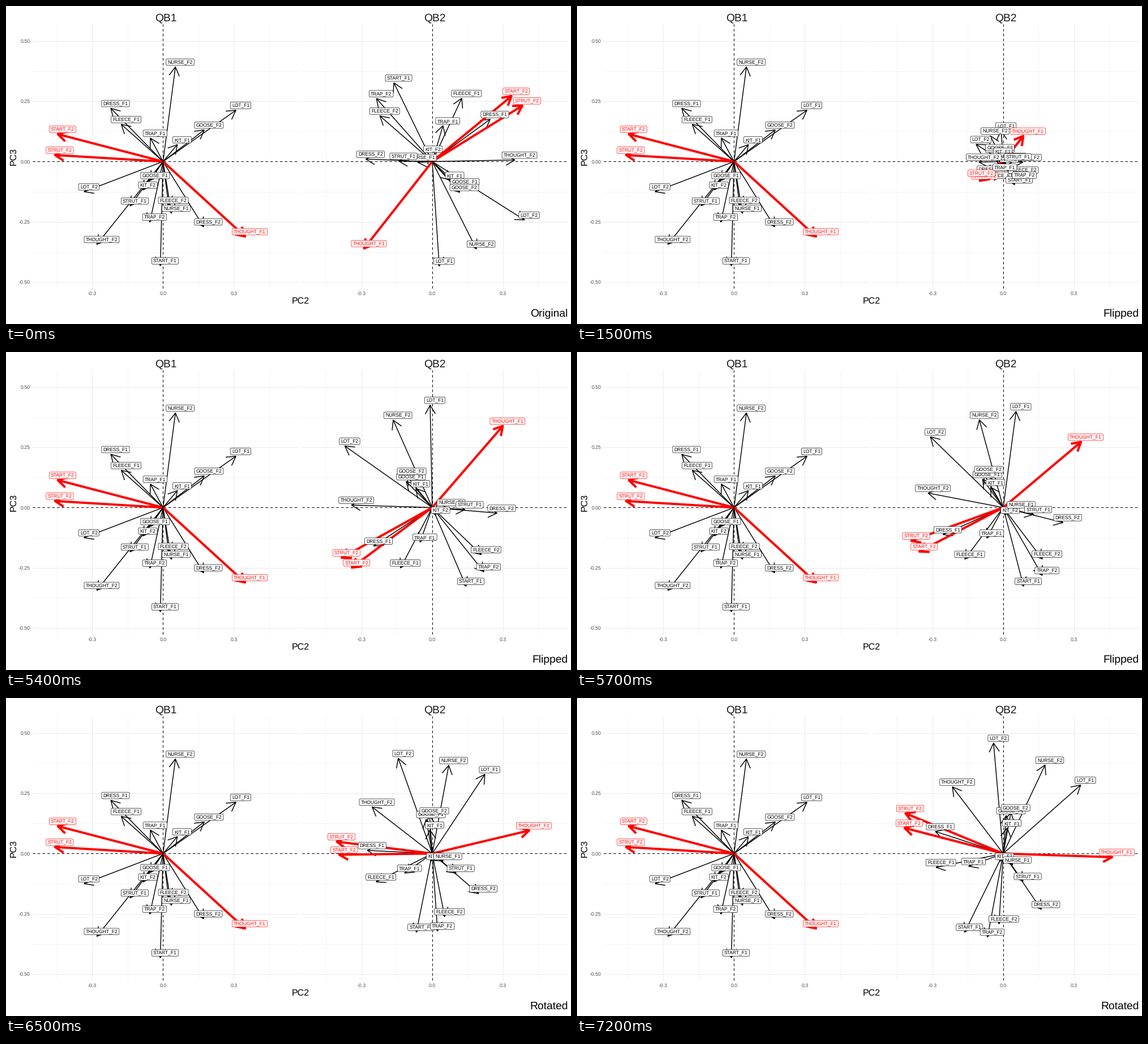
Write a matplotlib script that moves like this. It is 998 by 561 pixels and loops after 8 s.

```python
import numpy as np
import matplotlib.pyplot as plt
from matplotlib.animation import FuncAnimation
from matplotlib.patches import FancyBboxPatch

W, H, DPI = 998, 561, 64
PT = 72 / DPI                      # points per pixel
FRAMES, INTERVAL = 80, 100
FLIP_START, ROTATE_START, STEPS = 4, 53, 17
ANGLE = np.radians(-53.1)

SCALE = np.array([416.5, -425.7])  # pixels per data unit
ORIGINS = [np.array([277.4, 274.4]), np.array([752.9, 274.4])]
PANELS = [(47.5, 517.2), (523, 992.5)]
TOP, BOTTOM = 32.3, 498
NUDGE = 0.02
HEAD, HEAD_ANGLE = 18, np.radians(30)
LABEL_SIZE, LABEL_HEIGHT, LABEL_PAD = 8.54, 11.6, 5.2

VOWELS = "DRESS FLEECE GOOSE KIT LOT NURSE START STRUT THOUGHT TRAP".split()
NAMES = [f"{vowel}_F{n}" for vowel in VOWELS for n in (1, 2)]
HIGHLIGHTED = {"START_F2", "STRUT_F2", "THOUGHT_F1"}

QB1 = np.array([
    (-.2215, .2205), (.172, -.270), (-.177, .154), (.0235, -.181),
    (-.0535, -.078), (.1745, .131), (.0605, .070), (-.0845, -.1175),
    (.309, .2125), (-.3345, -.125), (.0355, -.214), (.0525, .392),
    (-.0115, -.4315), (-.446, .1135), (-.140, -.1835), (-.458, .027),
    (.3475, -.3105), (-.2805, -.343), (-.0535, .097), (-.056, -.2505)])
QB2 = np.array([
    (.2455, .175), (-.2815, .010), (.125, .262), (-.222, .189),
    (.118, -.1045), (.116, -.1275), (.075, -.077), (-.017, .031),
    (.030, -.433), (.391, -.242), (-.061, -.0035), (.187, -.362),
    (-.1625, .326), (.336, .271), (-.142, .002), (.382, .2315),
    (-.289, -.360), (.350, .0065), (.0455, .1485), (-.2365, .261)])
FLIPPED = -QB2
c, s = np.cos(ANGLE), np.sin(ANGLE)
ROTATED = FLIPPED @ np.array([[c, s], [-s, c]])

plt.rcParams["font.family"] = "Liberation Sans"
plt.rcParams["text.hinting"] = "none"

fig = plt.figure(figsize=(W / DPI, H / DPI), dpi=DPI, facecolor="white")
ax = fig.add_axes([0, 0, 1, 1])
ax.set_xlim(0, W)
ax.set_ylim(H, 0)
ax.axis("off")


def line(xs, ys, width, color, z, **style):
    return ax.plot(xs, ys, lw=width * PT, color=color, zorder=z, **style)[0]


def text(x, baseline, string, size, color="black", ha="center", **style):
    return ax.text(x, baseline, string, fontsize=size * PT, color=color,
                   ha=ha, va="baseline", **style)


class Arrow:
    """Loading vector with an open head and a boxed name near its tip."""

    def __init__(self, name, origin, order):
        self.origin = origin
        red = name in HIGHLIGHTED
        color = "red" if red else "black"
        self.shaft = line([], [], 4 if red else 1.45, color, 4 + order / 100,
                          solid_capstyle="butt", solid_joinstyle="round")
        self.text = text(0, 0, name, LABEL_SIZE, color, zorder=10.5 + order)
        self.width = self.text.get_window_extent().width + LABEL_PAD
        self.box = FancyBboxPatch(
            (0, 0), self.width, LABEL_HEIGHT,
            boxstyle="round,pad=0,rounding_size=2.1", facecolor="white",
            edgecolor=color, lw=0.65 * PT, zorder=10 + order)
        ax.add_patch(self.box)

    def point_to(self, value):
        tip = self.origin + value * SCALE
        back = np.arctan2(*(self.origin - tip)[::-1])
        barbs = [tip + HEAD * np.array([np.cos(a), np.sin(a)])
                 for a in (back - HEAD_ANGLE, back + HEAD_ANGLE)]
        gap = (np.nan, np.nan)
        self.shaft.set_data(
            *np.array([self.origin, tip, gap, barbs[0], tip, barbs[1]]).T)
        x, y = tip + NUDGE * SCALE
        self.box.set_bounds(x - self.width / 2, y - LABEL_HEIGHT / 2,
                            self.width, LABEL_HEIGHT)
        self.text.set_position((x, y + 0.358 * LABEL_SIZE))


def draw_panel(title, origin, left, right):
    def h_line(value, *args, **style):
        y = origin[1] + value * SCALE[1]
        line([left, right], [y, y], *args, **style)

    def v_line(value, *args, **style):
        x = origin[0] + value * SCALE[0]
        line([x, x], [BOTTOM, TOP], *args, **style)

    for value in (-.375, -.125, .125, .375):
        h_line(value, 0.53, "#ebebeb", 1)
    for value in (-.45, -.15, .15, .45):
        v_line(value, 0.53, "#ebebeb", 1)
    for value in (-.5, -.25, 0, .25, .5):
        h_line(value, 1.07, "#ebebeb", 2)
    for value in (-.3, 0, .3):
        v_line(value, 1.07, "#ebebeb", 2)
        text(origin[0] + value * SCALE[0], 509.6, f"{value:.1f}", 8.8, "#4d4d4d")
    dashes = dict(linestyle=(0, (4, 4)), dash_capstyle="butt")
    h_line(0, 1.07, "black", 3, **dashes)
    v_line(0, 1.07, "black", 3, **dashes)
    text((left + right) / 2, 26.3, title, 19.2, "#1a1a1a")


for title, origin, (left, right) in zip(("QB1", "QB2"), ORIGINS, PANELS):
    draw_panel(title, origin, left, right)
for value in (-.5, -.25, 0, .25, .5):
    text(42.7, ORIGINS[0][1] + value * SCALE[1] + 3.1, f"{value:.2f}", 8.8,
         "#4d4d4d", ha="right")
text(520, 525.2, "PC2", 16)
ax.text(17.2, 265.2, "PC3", fontsize=16 * PT, rotation=90,
        rotation_mode="anchor", ha="center", va="baseline")
caption = text(992.5, 548.4, "", 19.2, ha="right")

fixed, moving = [[Arrow(name, origin, i) for i, name in enumerate(NAMES)]
                 for origin in ORIGINS]
for arrow, value in zip(fixed, QB1):
    arrow.point_to(value)


def progress(frame, start):
    return min(max((frame - start) / STEPS, 0), 1)


def update(frame):
    flip = progress(frame, FLIP_START)
    turn = progress(frame, ROTATE_START)
    values = QB2 + (FLIPPED - QB2) * flip + (ROTATED - FLIPPED) * turn
    for arrow, value in zip(moving, values):
        arrow.point_to(value)
    if frame < FLIP_START + 10:
        caption.set_text("Original")
    elif frame < ROTATE_START + 10:
        caption.set_text("Flipped")
    else:
        caption.set_text("Rotated")
    return []


anim = FuncAnimation(fig, update, frames=FRAMES, interval=INTERVAL,
                     init_func=lambda: update(0), repeat=True, blit=False)
plt.show()
```
